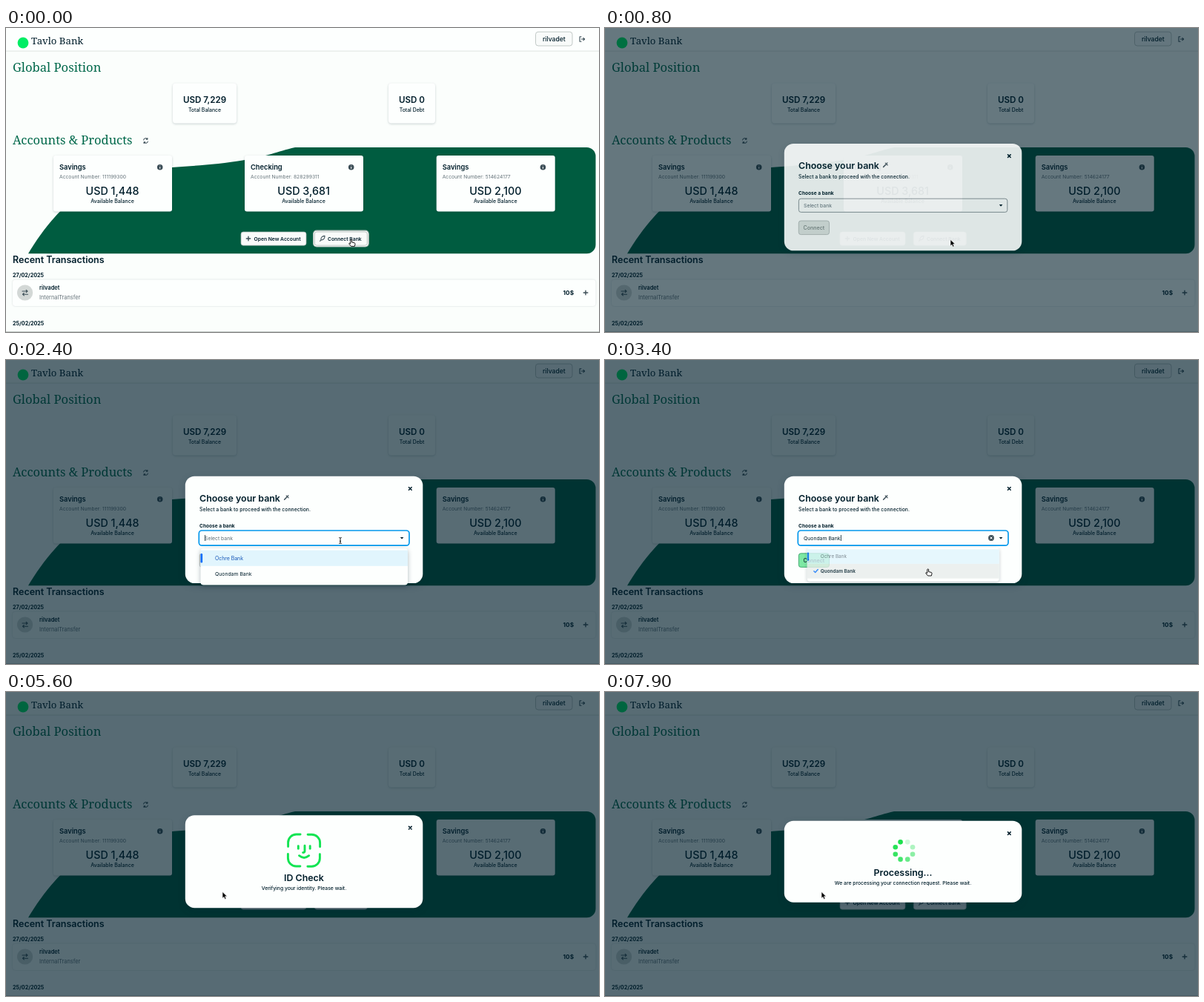
Write an HTML page that moves like this. It is 800 px wide and 410 px high and loops after 8000 ms.

```html
<!DOCTYPE html>
<html lang="en">
<head>
<meta charset="utf-8">
<title>Connect a bank</title>
<style>
  html, body { margin: 0; width: 100%; height: 100%; overflow: hidden; background: #fbfefc; }
  svg { display: block; width: 100vw; height: 100vh; }
  text { font-family: Inter, "Open Sans", sans-serif; fill: #001e2b; white-space: pre; }
  .serif { font-family: "Noto Serif", "Liberation Serif", serif; }
  .card { fill: #fdfffe; filter: drop-shadow(0 1.4px 1.5px rgba(0, 30, 43, .2)); }
  .row { fill: #fdfffe; filter: drop-shadow(0 .8px .8px rgba(0, 30, 43, .16)); }
  .modal { fill: #fdfffe; filter: drop-shadow(0 3px 5px rgba(0, 30, 43, .2)); }
  .menu { fill: #fdfffe; filter: drop-shadow(0 2px 3px rgba(0, 30, 43, .3)); }
  .button { fill: #f9fbfa; stroke: #a9b3b0; stroke-width: .7; }
  .line { fill: none; stroke: #3d4f58; stroke-width: 1.1; stroke-linecap: round; stroke-linejoin: round; }
  .face { fill: none; stroke: #12e452; stroke-width: 2.9; stroke-linecap: round; stroke-linejoin: round; }
</style>
</head>
<body>
<svg id="stage" viewBox="0 0 800 410" xmlns="http://www.w3.org/2000/svg"></svg>
<script>
const LOOP = 8000;
const INK = '#001e2b', GREY = '#5c6c75', GREEN = '#00684a';
const BRAND = 'Tavlo Bank', USER = 'rilvadet', BANKS = ['Ochre Bank', 'Quondam Bank'];

// Key moments in ms
const OPEN = 700, FOCUS = 2300, HOVER = 2900, PICK = 3380, SUBMIT = 4480, FACE = 4850, PROCESS = 7300;

const text = (x, y, size, str, { weight = 400, fill = INK, anchor = 'start', cls = '', id = '' } = {}) =>
  `<text x="${x}" y="${y}" font-size="${size}" font-weight="${weight}" style="fill:${fill}"
    text-anchor="${anchor}" class="${cls}" id="${id}">${str}</text>`;
const mid = (x, y, size, str, weight = 500) => text(x, y, size, str, { weight, anchor: 'middle' });
const rect = (x, y, w, h, rx, attrs) =>
  `<rect x="${x}" y="${y}" width="${w}" height="${h}" rx="${rx}" ${attrs}/>`;
const line = (d, attrs = '') => `<path d="${d}" class="line" ${attrs}/>`;
const group = (id, body) => `<g id="${id}">${body}</g>`;

const plus = (x, y, r) => line(`M${x - r} ${y}h${2 * r}M${x} ${y - r}v${2 * r}`, 'style="stroke-width:1.4"');
const cross = (x, y, r = 1.8) =>
  line(`M${x - r} ${y - r}l${2 * r} ${2 * r}m0 ${-2 * r}l${-2 * r} ${2 * r}`, `style="stroke:${INK};stroke-width:1.6"`);

function total(x, w, amount, label) {
  const cx = x + w / 2;
  return rect(x, 74.5, w, 54, 4, 'class="card"') + mid(cx, 101, 11.6, amount, 600) + mid(cx, 112.5, 6.9, label);
}

function account(x, name, number, amount) {
  return rect(x, 172, 160, 75.5, 3, 'class="card"') +
    text(x + 8, 191.3, 9.3, name, { weight: 600 }) +
    text(x + 8, 202.7, 6.75, `Account Number: ${number}`, { fill: '#66737a' }) +
    `<circle cx="${x + 143.7}" cy="187.8" r="3.8" fill="#3d4f58"/>` +
    `<path d="M${x + 143.7} 187.3v2.4m0-4.3v.6" stroke="#fff" stroke-width="1.1"/>` +
    mid(x + 79.6, 225.2, 14.3, amount, 500) +
    mid(x + 79.6, 236.3, 7, 'Available Balance');
}

function header() {
  return rect(0, 0, 800, 31, 0, 'fill="#fdfffe"') +
    rect(0, 30.6, 800, 1, 0, 'fill="#dfe5e2"') +
    '<circle cx="23" cy="20" r="7.4" fill="#00ed64"/>' +
    text(34, 22.2, 13.2, BRAND, { weight: 500, cls: 'serif' }) +
    rect(714.5, 5.2, 49.5, 18.8, 3.5, 'class="button"') +
    mid(739.3, 17.7, 8.6, USER) +
    line('M776 11.8h-2v6.4h2M776.5 15h4m-1.6-1.7l1.7 1.7l-1.7 1.7');
}

function transactions() {
  return text(9, 317.3, 12.5, 'Recent Transactions', { weight: 600 }) +
    text(9, 335.6, 7.2, '27/02/2025', { weight: 700 }) +
    rect(9, 339.5, 786.5, 35.5, 4, 'class="row"') +
    '<circle cx="25.6" cy="357" r="10.6" fill="#d3d8d6"/>' +
    line('M22 355h7m-1.8-1.7l1.8 1.7l-1.8 1.7M29.5 359.2h-7m1.8-1.7l-1.8 1.7l1.8 1.7') +
    text(45, 353.3, 7.5, USER, { weight: 600 }) +
    text(45, 366.2, 7.4, 'InternalTransfer', { fill: '#66737a' }) +
    text(766, 360.2, 8.2, '10$', { weight: 700, anchor: 'end' }) +
    plus(782, 357, 2.8) +
    text(9, 400.6, 7.2, '25/02/2025', { weight: 700 }) +
    rect(0, 409.2, 800, 1, 0, 'fill="#b9c0bd"');
}

function page() {
  const title = { fill: GREEN, cls: 'serif' };
  return rect(0, 0, 800, 410, 0, 'fill="#fbfefc"') + header() +
    text(9, 59.3, 16.6, 'Global Position', title) +
    total(225, 86, 'USD 7,229', 'Total Balance') +
    total(516, 63, 'USD 0', 'Total Debt') +
    text(9, 156.6, 16.5, 'Accounts &amp; Products', title) +
    line('M185.6 151a2.9 2.9 0 0 1 5.1-1.2m.2-1.3v1.6h-1.6M191.4 153a2.9 2.9 0 0 1-5.1 1.2m-.2 1.3v-1.6h1.6') +
    `<path fill="#005c40" d="M30 304.3C55 262 95 215 150 198C200 185 250 190 322 178C352 173 365 167 390 161
      H783.5a12 12 0 0 1 12 12V292.3a12 12 0 0 1-12 12Z"/>` +
    account(64, 'Savings', '111199300', 'USD 1,448') +
    account(322, 'Checking', '828299311', 'USD 3,681') +
    account(580.7, 'Savings', '514624177', 'USD 2,100') +
    rect(317, 275, 88, 18.2, 3, 'class="button"') + plus(327, 284, 2.7) +
    text(334.5, 286.5, 6.75, 'Open New Account', { weight: 600 }) +
    group('ring', rect(414.6, 273.2, 74.6, 21.8, 4.5, 'fill="#fdfffe" stroke="#b7c0bd" stroke-width="1.2"')) +
    rect(416.3, 275, 71, 18.2, 3, 'class="button"') +
    line('M423.6 287.4l1.6-1.7M425 286c-.6-3.4 1.4-5.4 5-5.6c0 3.8-1.8 5.9-5 5.6Z') +
    text(434, 286.5, 6.75, 'Connect Bank', { weight: 600 }) +
    transactions();
}

function chooser() {
  return rect(241.8, 156.7, 320.5, 144.4, 12.5, 'class="modal"') + cross(545.3, 173.5) +
    text(261, 190.6, 12.4, 'Choose your bank', { weight: 600 }) +
    line('M375.6 188.2l3.4-3.4', 'style="stroke-width:1.5"') + line('M378.2 183l3 2.8M380.9 182.6l-1.3 1.8') +
    text(261, 204, 6.86, 'Select a bank to proceed with the connection.', { weight: 500 }) +
    text(261, 225.5, 6.6, 'Choose a bank', { weight: 700 }) +
    rect(261.4, 231, 281.4, 18.2, 3, 'id="border" fill="#fdfffe" stroke="#6f7c82" stroke-width=".8"') +
    group('focus', rect(260.3, 230, 283.7, 20.2, 4, 'fill="#fdfffe" stroke="#0498ec" stroke-width="1.7"')) +
    text(268, 242.6, 6.85, '', { id: 'value' }) +
    rect(268, 236, .8, 8, 0, `id="caret" fill="${INK}"`) +
    group('clear', `<circle cx="521" cy="240" r="3.9" fill="#3d4f58"/>
      <path d="M519.5 238.5l3 3m0-3l-3 3" stroke="#fff" stroke-width="1"/>`) +
    `<path d="M531.8 238.9h4.6l-2.3 2.7Z" fill="${INK}"/>` +
    rect(261.3, 260.8, 41.2, 18.6, 3, 'id="submit" stroke-width=".8"') +
    text(281.9, 272.6, 7.1, 'Connect', { weight: 500, anchor: 'middle', id: 'submitLabel' }) +
    group('menu', rect(262.5, 254, 279.5, 49.5, 4, 'class="menu"') +
      rect(262.5, 256.6, 279.5, 21.2, 0, 'fill="#e1f5fd"') +
      rect(262.5, 261, 2.6, 12.4, 1.2, 'fill="#016bf8"') +
      text(282, 269.6, 6.9, BANKS[0], { fill: '#1254b7', id: 'first' }) +
      rect(262.5, 277.8, 279.5, 21.2, 0, 'id="hover" fill="#e8edeb"') +
      line('M272.3 288.3l2 2l3.8-4.4', 'id="check" style="stroke:#016bf8;stroke-width:1.5"') +
      text(282, 290.8, 6.85, BANKS[1], { id: 'second' }));
}

function face() {
  const corner = 'M380.6 208.5v-5.5a11 11 0 0 1 11-11h5.5';
  const corners = [0, 90, 180, 270].map(a =>
    `<path d="${corner}" transform="rotate(${a} 402 213.6)" pathLength="1"/>`).join('');
  const features = ['M394.3 207.8v3.4', 'M410.2 207.8v3.4', 'M403 207.2v7.4q0 2-2.4 2', 'M395.5 220.7q6.7 5.4 13.2 0']
    .map(d => `<path d="${d}" pathLength="1"/>`).join('');
  return `<g id="face" class="face">${corners}${features}</g>`;
}

function spinner() {
  const dots = Array.from({ length: 8 }, (_, i) => {
    const a = (i * 45 - 67.5) * Math.PI / 180;
    return `<circle cx="${403.4 + 12.6 * Math.cos(a)}" cy="${214 + 12.6 * Math.sin(a)}" r="3.3" fill="#1be04c"/>`;
  });
  return group('spinner', dots.join(''));
}

const status = () => group('status',
  rect(241.8, 187, 320.5, 83, 12.5, 'id="panel" class="modal"') +
  group('close', cross(545.3, 0)) +
  group('words', text(402, -36.2, 12.4, '', { weight: 600, anchor: 'middle', id: 'heading' }) +
    text(402, -24.2, 6.8, '', { weight: 500, anchor: 'middle', id: 'detail' })) +
  face() + spinner());

const cursors = () => group('cursor',
  group('arrow', '<path d="M0 0V8.6L2 6.8L3.4 9.8L5 9.1L3.6 6.1H6.3Z" fill="#000" stroke="#fff" stroke-width=".6"/>') +
  group('hand', `<path d="M-1.2 .4q1-1 1.8 0v3.2l3.4.8q1.3.4 1 1.8l-.7 2.8h-4.7l-2.8-3.3q-.2-1.2 1-1l1 .8Z"
    fill="#fff" stroke="#000" stroke-width=".9" stroke-linejoin="round"/>`) +
  group('beam', `<path d="M-1.7-4q1.7 0 1.7 1q0-1 1.7-1M0-3V3M-1.7 4q1.7 0 1.7-1q0 1 1.7 1M-1 .8h2"
    fill="none" stroke="#000" stroke-width=".9"/>`));

document.getElementById('stage').innerHTML = page() +
  rect(0, 0, 800, 410, 0, `id="shade" fill="${INK}"`) +
  group('chooser', chooser()) + status() + cursors();

const el = Object.fromEntries([...document.querySelectorAll('[id]')].filter(n => n.id).map(n => [n.id, n]));
const set = (id, attrs) => Object.entries(attrs).forEach(([k, v]) => el[id].setAttribute(k, v));
const show = (id, on) => set(id, { visibility: on ? 'inherit' : 'hidden' });
const fade = (id, p) => { set(id, { opacity: p }); show(id, p > 0); };
const write = (id, str) => { if (el[id].textContent !== str) el[id].textContent = str; };
const ramp = (t, a, b) => Math.min(1, Math.max(0, (t - a) / (b - a)));
const ease = p => p * p * (3 - 2 * p);

const moves = [ // start, end, x, y
  [1200, 2100, 451, 243.5],
  [2600, 3050, 436, 282],
  [3650, 4200, 292, 269.6],
];

function drawCursor(t) {
  let x = 466, y = 285.4;
  for (const [a, b, toX, toY] of moves) {
    const p = ease(ramp(t, a, b));
    x += (toX - x) * p;
    y += (toY - y) * p;
  }
  const hand = t < OPEN || (t >= 2750 && t < 3700) || (t >= 4100 && t < SUBMIT);
  const beam = t >= 1950 && t < 2750;
  set('cursor', { transform: `translate(${x} ${y})` });
  show('hand', hand);
  show('beam', beam);
  show('arrow', !hand && !beam);
}

function drawChooser(t) {
  const shown = ramp(t, OPEN, OPEN + 115);
  fade('chooser', shown * (1 - ramp(t, SUBMIT, SUBMIT + 130)));
  set('chooser', { transform: `translate(0 ${shown < 1 ? -.8 : 0})` });

  const focused = t >= FOCUS, picked = t >= PICK;
  show('border', !focused);
  show('focus', focused);
  show('clear', picked);
  write('value', picked ? BANKS[1] : 'Select bank');
  el.value.style.fill = picked ? INK : GREY;
  show('caret', focused && (t - FOCUS) % 1000 < 500 || picked && t < PICK + 500);
  set('caret', { x: picked ? 268.4 + el.value.getComputedTextLength() : 268 });

  const menu = ramp(t, FOCUS, FOCUS + 100) * (1 - ramp(t, PICK, PICK + 100));
  const k = 1 - .35 * (1 - menu);
  fade('menu', menu);
  set('menu', { transform: `translate(402 239) scale(${k}) translate(-402 -239)` });
  show('hover', t >= HOVER);
  show('check', picked);
  set('second', { 'font-weight': picked ? 700 : 400 });
  el.first.style.fill = picked ? GREY : '#1254b7';

  set('submit', { fill: picked ? '#7de8a3' : '#dde3e1', stroke: picked ? '#2f9a63' : '#aab3b1' });
  if (t >= PICK + 100) set('submit', { fill: '#00ed64' });
  el.submitLabel.style.fill = picked ? INK : '#75817f';
}

function drawStatus(t) {
  const processing = t >= PROCESS;
  const height = processing ? 110 : t >= FACE ? 125 : 83;
  const top = 228.7 - height / 2;
  fade('status', ramp(t, SUBMIT, SUBMIT + 130));
  set('panel', { y: top, height });
  set('close', { transform: `translate(0 ${top + 17})` });
  set('words', { transform: `translate(0 ${top + height})` });
  write('heading', processing ? 'Processing...' : 'ID Check');
  write('detail', processing ? 'We are processing your connection request. Please wait.'
    : 'Verifying your identity. Please wait.');

  const drawn = ramp(t, FACE, FACE + 500);
  show('face', drawn > 0 && !processing);
  set('face', { 'stroke-dasharray': drawn < 1 ? `${drawn} 2` : 'none' });

  show('spinner', processing);
  const head = 7 + Math.floor((t - 7900) / 125);
  [...el.spinner.children].forEach((dot, i) => {
    const age = (((head - i) % 8) + 8) % 8;
    dot.setAttribute('opacity', age < 4 ? 1 - age * .06 : .65 - (age - 4) * .15);
  });
}

function draw(t) {
  show('ring', t < OPEN);
  fade('shade', .65 * ramp(t, OPEN, OPEN + 110));
  drawChooser(t);
  drawStatus(t);
  drawCursor(t);
}

const start = performance.now();
function tick() {
  draw((performance.now() - start) % LOOP);
  requestAnimationFrame(tick);
}
draw(0);
requestAnimationFrame(tick);
</script>
</body>
</html>
```
